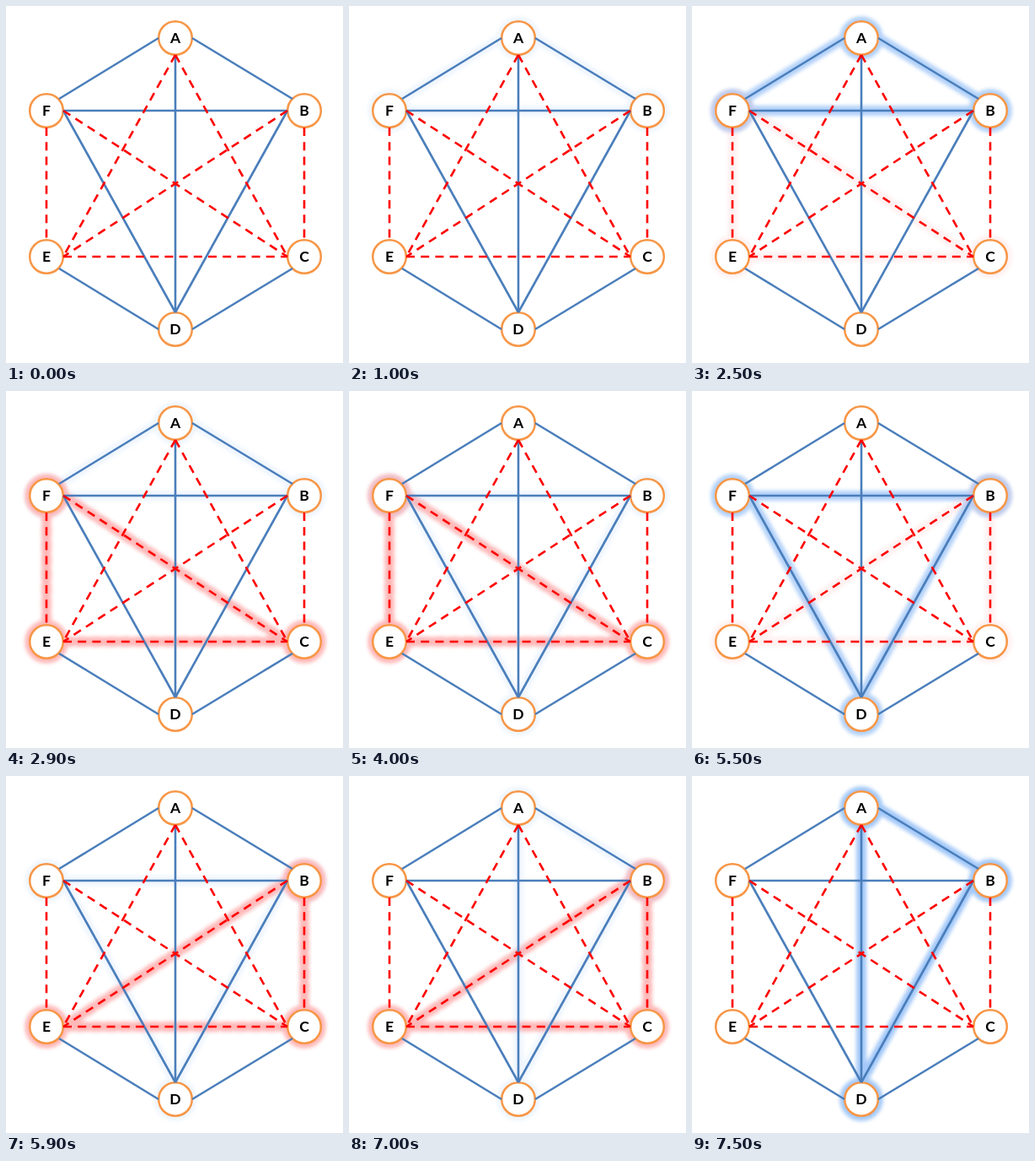
Animation of 400 by 423 pixels, one loop 8000 ms. Source, as an HTML page:

```html
<!DOCTYPE html>
<html lang="en">
<head>
<meta charset="utf-8">
<title>Triangles in a hexagon</title>
<style>
  html, body { margin: 0; width: 100%; height: 100%; overflow: hidden; background: #fff; }
  svg { display: block; width: 400px; height: 423px; }
  line, circle { fill: none; }
  .blue { stroke: #4a7ebb; stroke-width: 2.6; }
  .red { stroke: #fe0000; stroke-width: 2.6; stroke-dasharray: 10 7.2; }
  .node { fill: #fff; stroke: #f79646; stroke-width: 2.5; }
  .glow { filter: blur(2px); stroke-width: 12; stroke-linecap: round; opacity: 0; }
  .glow .red, .glow .blue { stroke: inherit; stroke-width: inherit; }
  text { font: bold 17.5px Carlito, Lato, "Open Sans", sans-serif; text-anchor: middle; fill: #000; }
</style>
</head>
<body>
<svg viewBox="0 0 400 423"></svg>
<script>
const LOOP = 8000, FIRST = 1000, GAP = 1500, STEP = 100, STEPS = 6;

const nodes = {
  A: [201, 38], B: [354, 124], C: [354, 297],
  D: [201, 383], E: [48, 297], F: [48, 124]
};

// Edge name: kind, x1, y1, x2, y2
const edges = {
  AF: ['blue', 181, 38, 63, 110],
  AB: ['blue', 221, 38, 340, 110],
  BF: ['blue', 68, 124, 334, 124],
  AD: ['blue', 201, 58, 201, 363],
  DF: ['blue', 68, 124, 201, 363],
  BD: ['blue', 334, 124, 201, 363],
  DE: ['blue', 63, 311, 181, 383],
  CD: ['blue', 340, 311, 221, 383],
  EF: ['red', 48, 144, 48, 277],
  BC: ['red', 354, 144, 354, 277],
  AE: ['red', 201, 58, 68, 297],
  AC: ['red', 201, 58, 334, 297],
  CF: ['red', 68, 124, 334, 297],
  BE: ['red', 334, 124, 68, 297],
  CE: ['red', 68, 297, 334, 297]
};

const triangles = ['ABF', 'CEF', 'BDF', 'BCE', 'ABD'];
const glowColor = { blue: '#a3c8f8', red: '#ffabab' };

const svg = document.querySelector('svg');

function add(parent, tag, attrs) {
  const el = document.createElementNS('http://www.w3.org/2000/svg', tag);
  for (const key in attrs) el.setAttribute(key, attrs[key]);
  return parent.appendChild(el);
}

function addEdge(parent, name) {
  const [kind, x1, y1, x2, y2] = edges[name];
  add(parent, 'line', { class: kind, x1, y1, x2, y2 });
}

function addCircle(parent, name, attrs) {
  const [cx, cy] = nodes[name];
  add(parent, 'circle', { cx, cy, r: 19.8, ...attrs });
}

const glows = triangles.map(tri => {
  const [a, b, c] = tri;
  const sides = [a + b, b + c, a + c];
  const group = add(svg, 'g', { class: 'glow', stroke: glowColor[edges[sides[0]][0]] });
  sides.forEach(side => addEdge(group, side));
  [...tri].forEach(name => addCircle(group, name, {}));
  return group;
});

for (const name in nodes) {
  const [x, y] = nodes[name];
  addCircle(svg, name, { class: 'node' });
  add(svg, 'text', { x, y: y + 6.2 }).textContent = name;
}
for (const name in edges) addEdge(svg, name);

// Stepped rise from 0 to 1 for the change with the given index
function level(t, index) {
  if (index >= triangles.length) return 0;
  const k = Math.floor((t - FIRST - GAP * index) / STEP) + 1;
  return Math.min(Math.max(k / STEPS, 0), 1);
}

function draw() {
  const t = performance.now() % LOOP;
  glows.forEach((group, i) => {
    group.style.opacity = level(t, i) - level(t, i + 1);
  });
  requestAnimationFrame(draw);
}
draw();
</script>
</body>
</html>
```
